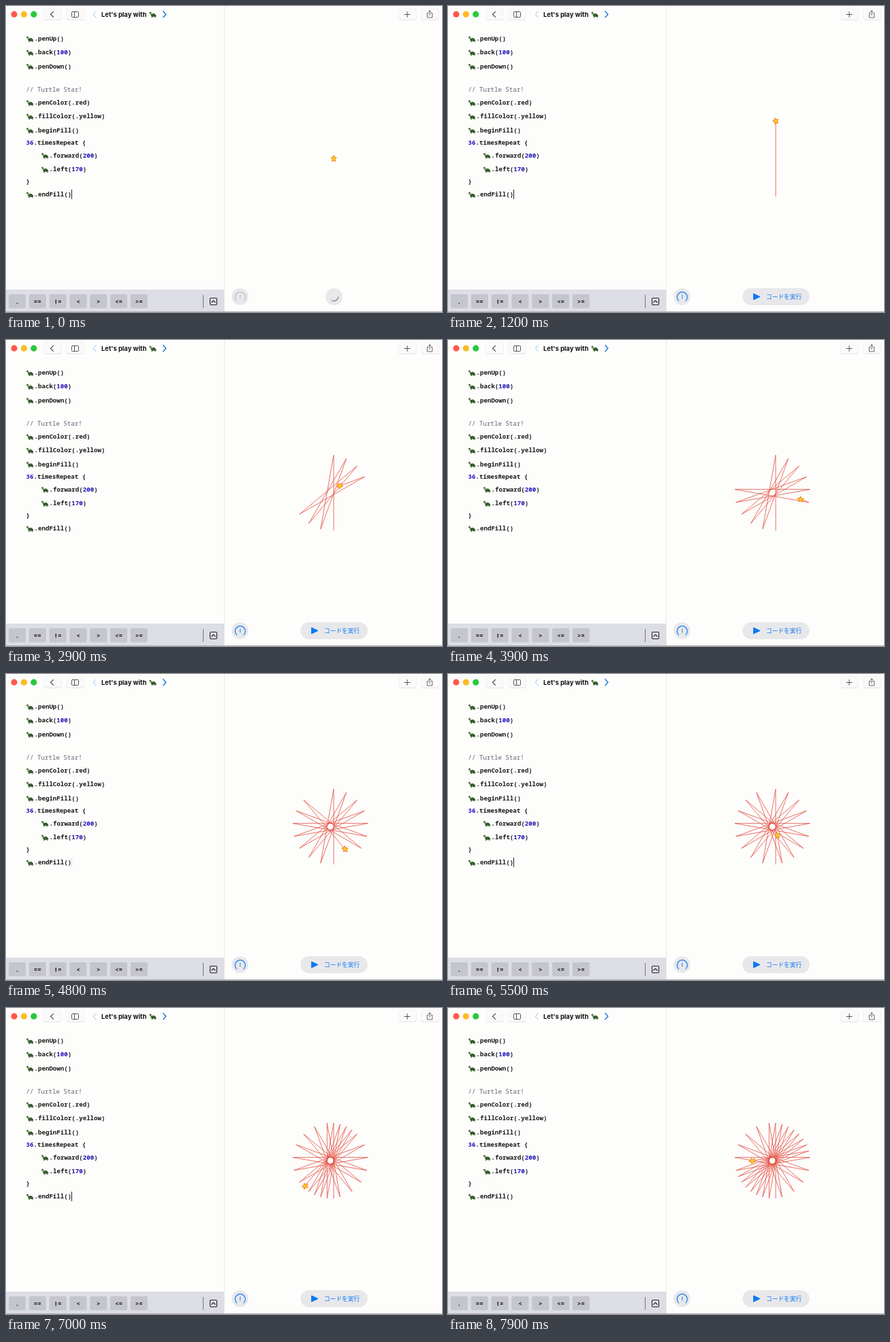
Recreate the animation shown at these times as an HTML page. Size 640x450 px, loop 8 s.

```html
<!DOCTYPE html>
<html lang="en">
<head>
<meta charset="utf-8">
<title>Turtle star</title>
<style>
  html, body { margin: 0; width: 100%; height: 100%; overflow: hidden; background: #fdfdfc; }
  svg { display: block; width: 640px; height: 450px; }
  text { white-space: pre; }
  .code { font: 600 9.14px "Noto Sans Mono", "DejaVu Sans Mono", monospace; fill: #1a1a1c; }
  .num { fill: #2015b8; }
  .comment { font-weight: 500; fill: #5d6672; }
  .title { font: 700 9.4px Inter, sans-serif; fill: #111; }
  .run { font: 500 8.7px "Noto Sans CJK JP", "Noto Sans CJK", sans-serif; fill: #0a78f5; }
  .line { fill: none; stroke-linecap: round; stroke-linejoin: round; }
</style>
</head>
<body>
<svg viewBox="0 0 640 450" xmlns="http://www.w3.org/2000/svg">
  <defs>
    <g id="turtle">
      <path d="M4 7.2 L3.2 9.6 H5.2 L6 7.8 H8 L8.4 9.6 H10.2 L9.8 7.2 L11.4 8.2 L10 6Z" fill="#5f8f45"/>
      <path d="M.3 2.6 Q.4 .9 2 .9 Q3.6 1 3.5 2.8 L4.6 5.6 L3.6 7.2 Q2.2 6.6 2 4.2 Q.2 4.2 .3 2.6Z" fill="#5f8f45"/>
      <path d="M3 7.6 Q3.6 3.6 6.3 3.6 Q9.6 3.8 10.4 7.6 Q6.8 8.7 3 7.6Z" fill="#2f5030"/>
      <path d="M4.8 6 L6.2 4.7 L8 5.8 L6.6 7.1Z" fill="#4d7338"/>
      <circle cx="1.6" cy="2.3" r=".5" fill="#222"/>
    </g>
  </defs>
  <rect width="640" height="450" fill="#fdfdfc"/>
  <path d="M320.5 0V450" stroke="#e9e9e2"/>
  <g id="header"></g>
  <g id="code"></g>
  <path id="caret" d="M96.5 270V284" stroke="#222"/>

  <rect y="417" width="320" height="33" fill="#dddde6"/>
  <g id="keys"></g>
  <path d="M289.5 425V444" stroke="#74747c"/>
  <g class="line" stroke="#222" stroke-width="1.1">
    <rect x="299.5" y="429.5" width="10" height="10" rx="1.5"/>
    <path d="M301.8 436L304.5 433.2L307.2 436"/>
  </g>

  <path id="trail" class="line" stroke="#e4574a" stroke-width=".85"/>
  <path id="star" fill="#ffc622" stroke="#f08a2e" stroke-linejoin="round"/>

  <circle cx="343.5" cy="427.5" r="12.3" fill="#e8e8eb"/>
  <g id="gauge" class="line" stroke-width="1.3">
    <path d="M338.6 433.6A7.5 7.5 0 1 1 349 433.6"/>
    <path d="M343.8 425V430" stroke-width="1"/>
  </g>
  <rect id="pill" y="415" height="25" rx="12.5" fill="#e8e8eb"/>
  <path id="spinner" class="line" d="M487.7 427.5A6.2 6.2 0 0 1 478.4 432.9" stroke="#8b8b90" stroke-width="1.2"/>
  <g id="runLabel">
    <path d="M448.5 423L458 427.5L448.5 432Z" fill="#0a78f5" stroke="#0a78f5" stroke-linejoin="round"/>
    <text class="run" x="467" y="430.8">コードを実行</text>
  </g>
  <path d="M0 449.5H640" stroke="#b4b4b6"/>
</svg>
<script>
const LOOP = 8000, STEP = 100;
const LENGTH = 110.5, HOME = { x: 481, y: 224.5 };
const DRAW_START = 1025, CYCLE = 259.6, MOVE_SHARE = 0.634; // move, then turn

const byId = id => document.getElementById(id);
const set = (id, attrs) => {
  for (const [name, value] of Object.entries(attrs)) byId(id).setAttribute(name, value);
};
const clamp = v => Math.min(1, Math.max(0, v));
const ramp = (t, from, to) => clamp((t - from) / (to - from));
const turtle = (x, y) => `<use href="#turtle" x="${x}" y="${y}"/>`;

function buildHeader() {
  const lights = ['#ff5a4c', '#fcbb24', '#2ac840']
    .map((c, i) => `<circle cx="${12 + i * 14.4}" cy="12.2" r="4.6" fill="${c}"/>`);
  const buttons = [55, 88, 576, 609].map(x =>
    `<rect x="${x + .5}" y="4" width="26" height="17" rx="3" fill="#e2e2e4"/>` +
    `<rect x="${x + .5}" y="3" width="26" height="17" rx="3" fill="#fafafa" stroke="#f0f0f0" stroke-width=".6"/>`);
  byId('header').innerHTML = lights.join('') + buttons.join('') + `
    <g class="line" stroke="#444" stroke-width=".9">
      <path d="M69.5 8.3L65.5 12.3L69.5 16.3" stroke-width="1.2"/>
      <rect x="96.5" y="8.5" width="10" height="8" rx="1"/>
      <path d="M100.5 8.5V16.5"/>
      <path d="M585 12.5H593M589 8.5V16.5"/>
      <path d="M620 10.5H618.3V17H625.7V10.5H624M622 13.5V6.8M620 8.8L622 6.8L624 8.8" stroke-width=".8"/>
      <path d="M132.2 7.8L128.2 12.3L132.2 16.8" stroke="#b4d6f6" stroke-width="1.2"/>
      <path d="M230.8 7.8L234.8 12.3L230.8 16.8" stroke="#1678d8" stroke-width="1.4"/>
    </g>
    <text class="title" x="140" y="15.6">Let's play with</text>` + turtle(210, 7.5);
}

function buildCode() {
  const lines = [
    [48, '@.penUp()'], [68, '@.back(100)'], [88.5, '@.penDown()'],
    [122.5, '// Turtle Star!'], [142, '@.penColor(.red)'], [162, '@.fillColor(.yellow)'],
    [182.5, '@.beginFill()'], [201, '36.timesRepeat {'],
    [219.5, '  @.forward(200)'], [240, '  @.left(170)'], [258, '}'], [277, '@.endFill()']
  ];
  byId('code').innerHTML = lines.map(([y, raw]) => {
    let x = raw.startsWith(' ') ? 51.6 : 29.6, icon = '';
    let source = raw.trim();
    if (source[0] === '@') {
      icon = turtle(x, y - 4.5);
      source = source.slice(1);
      x += 11.9;
    }
    const style = source.startsWith('//') ? 'code comment' : 'code';
    const body = source.replace(/\d+/g, n => `<tspan class="num">${n}</tspan>`);
    return `${icon}<text class="${style}" x="${x}" y="${y + 3}">${body}</text>`;
  }).join('');
}

function buildKeys() {
  byId('keys').innerHTML = ['.', '==', '!=', '&lt;', '&gt;', '&lt;=', '&gt;='].map((label, i) => {
    const x = 4 + i * 29.8;
    return `<rect x="${x}" y="424" width="25" height="20.5" rx="2" fill="#c5c5cc"/>` +
      `<text class="code" x="${x + 12.5}" y="437.5" text-anchor="middle">${label}</text>`;
  }).join('');
}

function buildStar() {
  const points = Array.from({ length: 10 }, (_, i) => {
    const r = i % 2 ? 2.8 : 5, a = i * Math.PI / 5;
    return `${(.85 * r * Math.sin(a)).toFixed(2)} ${(-r * Math.cos(a)).toFixed(2)}`;
  });
  set('star', { d: `M${points.join('L')}Z` });
}

function drawTurtle(t) {
  const cycles = Math.max(0, (t - DRAW_START) / CYCLE);
  const done = Math.floor(cycles), phase = cycles - done;
  let x = HOME.x, y = HOME.y + LENGTH / 2 * ramp(t, 840, 1005);
  const points = [`${x} ${y}`];
  for (let k = 0; k <= done; k++) {
    const part = k < done ? 1 : clamp(phase / MOVE_SHARE);
    const heading = (90 + 170 * k) * Math.PI / 180;
    x += LENGTH * part * Math.cos(heading);
    y -= LENGTH * part * Math.sin(heading);
    points.push(`${x.toFixed(2)} ${y.toFixed(2)}`);
  }
  const turn = 170 * (done + ramp(phase, MOVE_SHARE, 1));
  set('trail', { d: cycles > 0 ? `M${points.join('L')}` : '' });
  set('star', { transform: `translate(${x} ${y}) rotate(${-turn})` });
}

function drawControls(t) {
  const open = ramp(t, 400, 700), width = 25 + 73.5 * open;
  set('pill', { x: 481.5 - width / 2, width });
  set('spinner', { opacity: 1 - ramp(t, 300, 500), transform: `rotate(${t * .36} 481.5 427.5)` });
  set('runLabel', { opacity: ramp(t, 500, 700) });
  set('gauge', { stroke: t < 500 ? '#bcbcc2' : '#1a7ef0' });
  set('caret', { opacity: 1 - ramp(t % 1000, 600, 830) });
}

function render(time) {
  const t = Math.floor(time % LOOP / STEP) * STEP;
  drawTurtle(t);
  drawControls(t);
}

buildHeader();
buildCode();
buildKeys();
buildStar();
const start = performance.now();
function tick() {
  render(performance.now() - start);
  requestAnimationFrame(tick);
}
tick();
</script>
</body>
</html>
```
